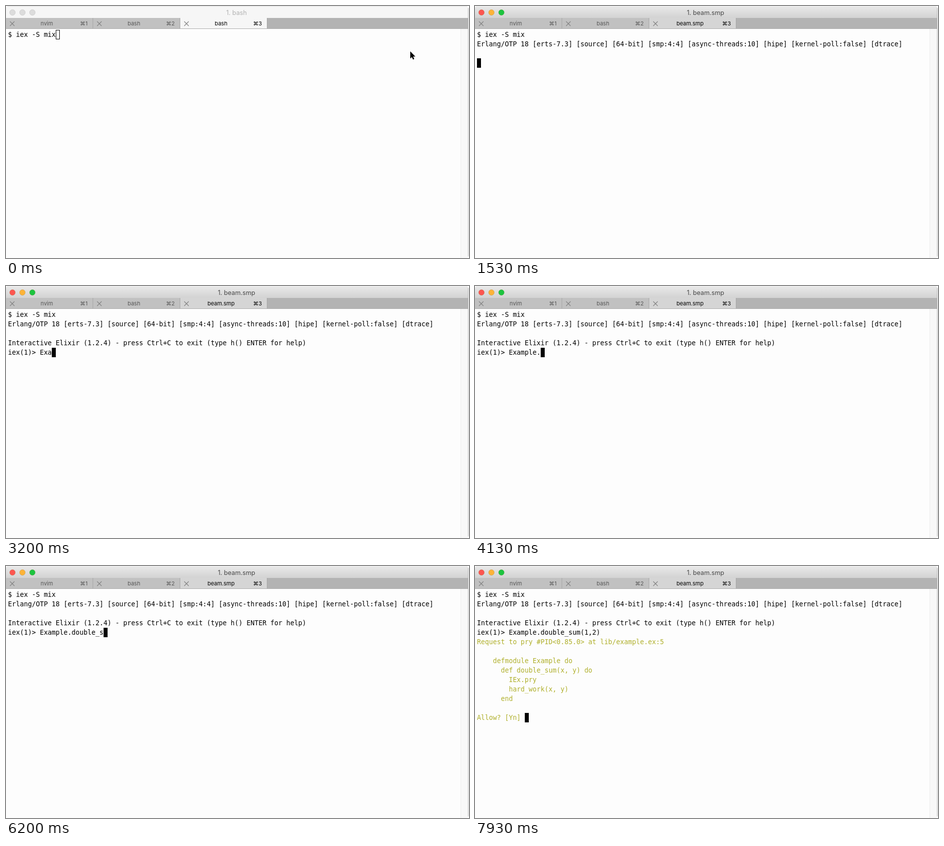
An HTML page with a canvas that plays this animation: 930 px wide and 506 px high, repeating every 8000 ms.

```html
<!DOCTYPE html>
<html lang="en">
<head>
<meta charset="utf-8">
<title>Terminal session</title>
<style>
  html, body { margin: 0; width: 100%; height: 100%; overflow: hidden; background: #fff; }
  canvas { display: block; width: 930px; height: 506px; }
</style>
</head>
<body>
<canvas width="930" height="506"></canvas>
<script>
const ctx = document.querySelector('canvas').getContext('2d');
const LOOP = 8000, CELL = 8, LINE = 19, LEFT = 4, TOP = 48;
const MONO = '13.288px "DejaVu Sans Mono", monospace';
const UI = '"Inter", sans-serif';
const OLIVE = '#b0b02c';

const FOCUS_AT = 600, RUN_AT = 1130, ERLANG_AT = 1400, ELIXIR_AT = 1800;
const ENTER_AT = 7470, PRY_AT = 7600;
const PROMPT = 'iex(1)> ';

// Typing bursts: text, time of first key, gap between keys
const bursts = [
  ['Example.', 2900, 150],
  ['do', 5050, 240],
  ['uble_sum(1,', 5570, 122],
  ['2)', 7030, 170]
];
const pryOutput = [
  'Request to pry #PID<0.85.0> at lib/example.ex:5',
  '',
  '    defmodule Example do',
  '      def double_sum(x, y) do',
  '        IEx.pry',
  '        hard_work(x, y)',
  '      end',
  '',
  'Allow? [Yn] '
];

function typedAt(t) {
  return bursts.map(([text, start, gap]) =>
    text.slice(0, Math.max(0, Math.floor((t - start) / gap) + 1))).join('');
}

function screenAt(t) {
  const lines = ['$ iex -S mix'];
  if (t >= RUN_AT) lines.push('');
  if (t >= ERLANG_AT) {
    lines[1] = 'Erlang/OTP 18 [erts-7.3] [source] [64-bit] [smp:4:4] [async-threads:10] [hipe] [kernel-poll:false] [dtrace]';
    lines.push('', '');
  }
  if (t >= ELIXIR_AT) {
    lines[3] = 'Interactive Elixir (1.2.4) - press Ctrl+C to exit (type h() ENTER for help)';
    lines.push(PROMPT + typedAt(t));
  }
  if (t >= PRY_AT) lines.push(...pryOutput);
  else if (t >= ENTER_AT) lines.push('');
  return lines;
}

function rect(x, y, w, h, color) {
  ctx.fillStyle = color;
  ctx.fillRect(x, y, w, h);
}

function label(text, x, y, font, color, align = 'left') {
  ctx.font = font;
  ctx.fillStyle = color;
  ctx.textAlign = align;
  ctx.fillText(text, x, y);
}

function strokePath(d, color, width) {
  ctx.strokeStyle = color;
  ctx.lineWidth = width;
  ctx.stroke(new Path2D(d));
}

function drawTitleBar(focused, process) {
  const shade = ctx.createLinearGradient(0, 0, 0, 24);
  shade.addColorStop(0, focused ? '#e9e9e9' : '#f6f6f6');
  shade.addColorStop(1, focused ? '#d3d3d3' : '#f6f6f6');
  rect(0, 0, 929, 24, shade);
  rect(0, 0, 929, 1, focused ? '#f4f4f4' : '#e2e2e2');
  ['#fc5650', '#fdb338', '#1cc43f'].forEach((color, i) => {
    ctx.beginPath();
    ctx.arc(13 + 20 * i, 13, 5.7, 0, 7);
    ctx.fillStyle = focused ? color : '#dcdcdc';
    ctx.fill();
    ctx.strokeStyle = focused ? 'rgba(110,70,0,.25)' : '#cccccc';
    ctx.lineWidth = 0.8;
    ctx.stroke();
  });
  label('1. ' + process, 463, 18, '12.7px ' + UI, focused ? '#484848' : '#b2b2b2', 'center');
}

function drawTabs(focused, process) {
  rect(0, 24, 929, 22, '#b3b3b3');
  ['nvim', 'bash', process].forEach((name, i) => {
    const x = 175 * i, active = i === 2;
    const color = active ? '#000' : '#585858';
    rect(x, 24, 174, 21, !active ? '#c1c1c1' : focused ? '#d5d5d5' : '#f6f6f6');
    rect(x + 174, 24, 1, 21, '#a6a6a6');
    strokePath(`M${x + 8} 31l9 9m0-9l-9 9`, '#828282', 1.2);
    label(name, x + 82, 39, '11px ' + UI, color, 'center');
    label('⌘' + (i + 1), x + 164, 39, '11px ' + UI, color, 'right');
  });
  rect(0, 45, 929, 1, '#acacac');
}

function drawTerminal(t, focused) {
  const lines = screenAt(t);
  lines.forEach((text, i) =>
    label(text, LEFT, TOP + 14 + LINE * i, MONO, i > 4 ? OLIVE : '#000'));
  const x = LEFT + CELL * lines.at(-1).length;
  const y = TOP + LINE * (lines.length - 1);
  if (focused) {
    rect(x, y, CELL, LINE, '#000');
  } else {
    ctx.strokeStyle = '#000';
    ctx.lineWidth = 1;
    ctx.strokeRect(x + 0.5, y + 0.5, CELL - 1, LINE - 1);
  }
}

function drawPointer(t, focused) {
  if (t >= RUN_AT) return;
  const p = Math.min(1, Math.max(0, (t - 70) / 480));
  const ease = p * p * (3 - 2 * p);
  ctx.save();
  ctx.translate(812 - 43 * ease, 91 + 36 * ease);
  if (focused) {
    const beam = 'M-3-7Q0-7 0-4.500Q0-7 3-7M0-5V5M-3 7Q0 7 0 4.500Q0 7 3 7M-2 2H2';
    strokePath(beam, '#fff', 2.6);
    strokePath(beam, '#545454', 1.2);
  } else {
    const arrow = 'M0 0V14.500L3.300 11.500L5.500 16.500L8 15.400L5.800 10.500H10.300Z';
    strokePath(arrow, '#fff', 2);
    ctx.fillStyle = '#000';
    ctx.fill(new Path2D(arrow));
  }
  ctx.restore();
}

function draw(t) {
  const focused = t >= FOCUS_AT;
  const process = t >= ERLANG_AT ? 'beam.smp' : 'bash';
  rect(0, 0, 930, 506, '#fff');
  ctx.save();
  ctx.beginPath();
  ctx.roundRect(0, 0, 929, 506, 5);
  ctx.clip();
  rect(0, 46, 929, 460, '#fdfdfd');
  rect(913, 46, 15, 460, '#f8f8f8');
  rect(913, 46, 1, 460, '#ededed');
  drawTitleBar(focused, process);
  drawTabs(focused, process);
  rect(928, 4, 1, 502, '#b8b8b8');
  drawTerminal(t, focused);
  ctx.restore();
  drawPointer(t, focused);
}

function tick() {
  draw(performance.now() % LOOP);
  requestAnimationFrame(tick);
}
tick();
</script>
</body>
</html>
```
